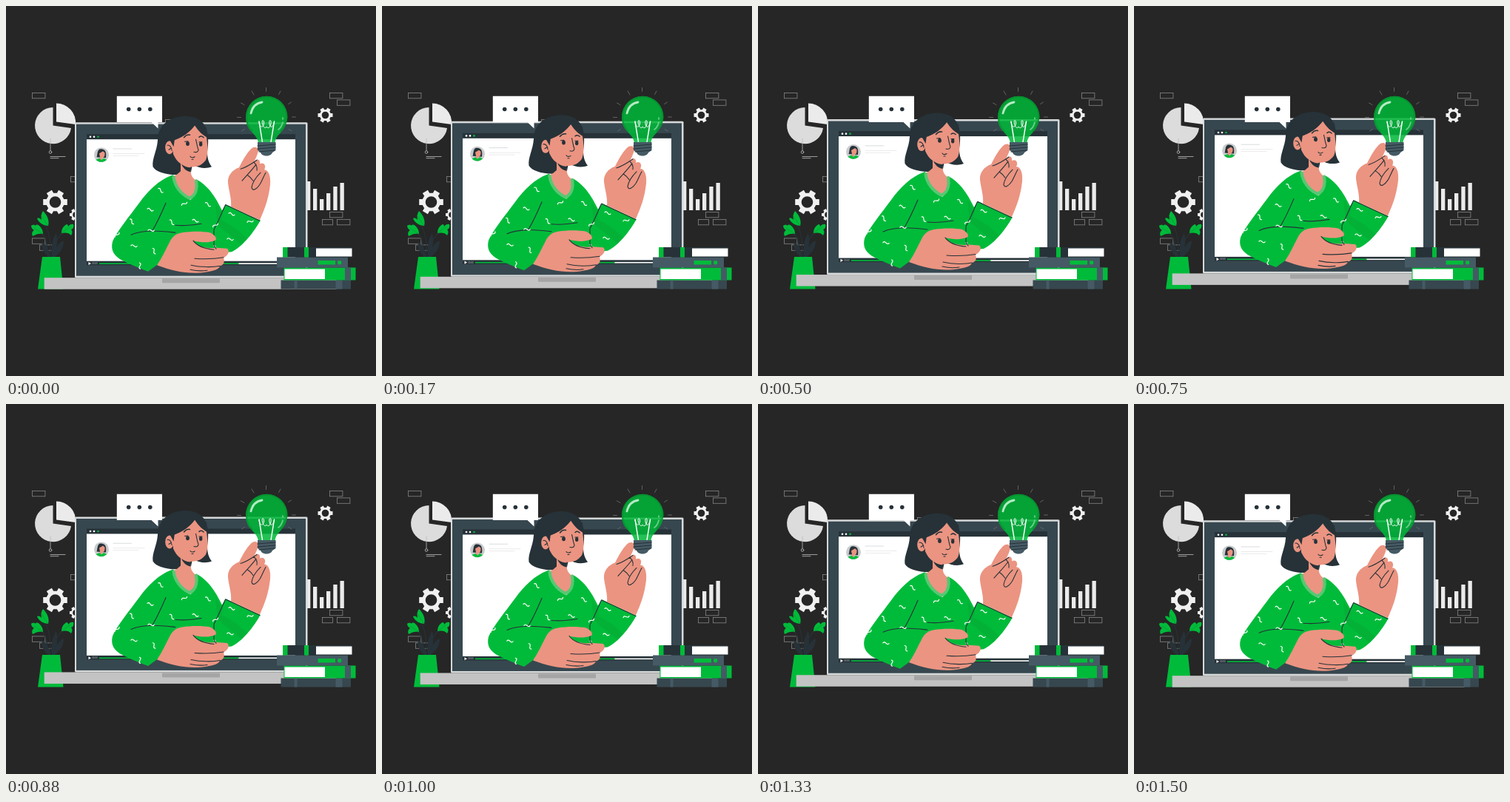
Animation of 500 by 500 pixels, one loop 1.54 s. Source, as an HTML page:

```html
<!DOCTYPE html>
<html lang="en">
<head>
<meta charset="utf-8">
<title>Online lesson</title>
<style>
  html, body { margin: 0; width: 100%; height: 100%; overflow: hidden; background: #262626; }
  svg { display: block; width: 100vw; height: 100vh; }
  .ink { fill: none; stroke: #263238; stroke-width: 1.1; stroke-linecap: round; stroke-linejoin: round; }
  .skin { fill: #eb9481; }
  .hair { fill: #263238; }
  .green { fill: #00bb3a; }
  .slate { fill: #37474f; }
  .line { fill: none; stroke-linecap: round; }
</style>
</head>
<body>
<svg viewBox="0 0 500 500">
  <rect width="500" height="500" fill="#262626"/>

  <g id="boxes" fill="none" stroke="#858585" stroke-width=".8"></g>

  <g id="pie">
    <path fill="#dcdcdc" d="M63.5 137A24.6 24.6 0 1 0 88 165L63.5 161.5Z"/>
    <path fill="#ebebeb" d="M68 131.5A26 26 0 0 1 94 160L68 156.5Z"/>
    <g class="line" stroke="#bdbdbd" stroke-width=".8">
      <path d="M60 179V195.5M60 203.5H80M60 205.7H71"/>
      <circle cx="60" cy="197.5" r="1.8"/>
    </g>
  </g>
  <g id="gears" fill="#f0f0f0" fill-rule="evenodd"></g>
  <g id="bars" fill="#ebebeb"></g>

  <g id="plant">
    <g class="line" stroke="#263238" stroke-width="1.2">
      <path d="M60 340C61 318 57 302 52 294M57 340C57 322 53 309 44 304M64 340C65 320 70 310 80 304"/>
    </g>
    <path class="hair" d="M57 339C48 331 48 324 49 319C56 324 59 331 60 339ZM62 339C60 324 64 312 68 307C71 318 68 331 64 339ZM64 339C66 327 71 320 78 317C78 327 73 334 66 339Z"/>
    <g class="green">
      <path d="M42 287C45 286 46 287 48 289C47 283 48 280 50 277C56 283 59 290 57 297C51 297 44 293 42 287Z"/>
      <path d="M34 297C37 295 39 296 40 297C40 295 43 295 45 297C49 301 50 304 50 308C45 307 41 308 36 311C34 307 36 304 38 303C36 302 34 300 34 297Z"/>
      <path d="M75 307C75 301 78 297 82 295C83 295 84 296 84 298C86 295 89 294 91 295C92 298 91 301 88 302C90 304 90 307 88 310C85 306 80 306 75 307Z"/>
    </g>
    <path class="line" stroke="#098b31" stroke-width=".6" d="M47 283L57 297M38 300L50 308M75 307L86 299"/>
    <path class="green" d="M49 339H73L77.5 382.5H43Z"/>
  </g>

  <g class="float">
    <rect x="93" y="157" width="314.5" height="210" rx="1.5" fill="#d6d9da"/>
    <rect class="slate" x="95" y="159.5" width="310" height="205"/>
    <rect class="hair" x="109" y="173" width="282" height="177"/>
    <rect x="109" y="180" width="282" height="164.5" fill="#fff"/>
    <g fill="#fff">
      <circle cx="114" cy="176.6" r="1.3"/>
      <circle cx="119" cy="176.6" r="1.3"/>
      <circle class="green" cx="124.5" cy="176.6" r="1.3"/>
      <path d="M111.5 345.7L115 347.8L111.5 349.9Z"/>
      <text x="116.5" y="348.9" font-family="Roboto, sans-serif" font-size="2.8" opacity=".7">00:00</text>
      <rect x="314" y="347.1" width="72" height="1.6"/>
      <rect class="green" x="126" y="347.1" width="188.5" height="1.6"/>
    </g>
    <g id="avatar">
      <circle cx="129" cy="201" r="10" fill="#c9cccd"/>
      <path class="hair" d="M128 193C123 193 124 200 122.5 204L135 205C136 198 135 193 128 193Z"/>
      <path class="skin" d="M126 199L131 196L133.5 198C134 203 132 205 130 205L130.5 208H127V204Z"/>
      <path class="green" d="M121.5 207.5L126.5 205.5L129 208L132 205.5L136 207.5A10 10 0 0 1 121.5 207.5Z"/>
    </g>
    <path class="line" stroke="#d3d7da" stroke-width=".9" d="M145 192.8H169.5"/>
    <path class="line" stroke="#e5e5e5" stroke-width=".8" d="M145 199.3H187M145 202.2H179"/>
    <rect x="51.7" y="367" width="395" height="15.5" fill="#c3c3c3"/>
    <path d="M211 368H289V373Q289 374 288 374H212Q211 374 211 373Z" fill="#a5a5a5"/>
  </g>

  <g id="bubble">
    <path fill="#fff" d="M149.8 121.7H211V157H205.5V165.5L196.5 157H149.8Z"/>
    <g class="hair">
      <circle cx="165.7" cy="139.5" r="2.8"/>
      <circle cx="180.3" cy="139.5" r="2.8"/>
      <circle cx="194.8" cy="139.5" r="2.8"/>
    </g>
  </g>

  <g class="float">
    <!-- back hair and neck -->
    <path class="hair" d="M242 148.5C222 149 205 160 205 181C204 196 197 206 198.5 217C203 225 222 230 241 227L250 224L252 214C261 219 270 220 278 217C273 210 272 204 272 196C274 184 274 170 268 160C262 152 253 148.5 242 148.5Z"/>
    <path class="skin" d="M236 211L236 223C233 226 230 228 226 230C229 243 237 256 248 262C257 256 260 245 256 235C251 231 249 228 249.5 215Z"/>
    <path class="hair" d="M237 213C241 217 246 218 250 218L249.5 224C244 223 239 219 237 213Z"/>

    <!-- blouse -->
    <path class="green" d="M223 229C207 235 192 249 180 266C166 285 150 304 144 318C141 330 146 338 158 344C170 350 180 354 192 358.5L205 349L250 345L285 334L305 332C320 325 335 305 343.5 289.5L297 268L292 276C285 262 275 243 257 234C260 246 257 256 249 262C238 257 230 245 226 228Z"/>
    <path fill="#08a735" opacity=".5" d="M283 266L297 288L326 314L318 322L286 296Z"/>
    <path class="green" d="M297 268L343.5 289.5C340 297 334 304 329 311L291 289Z"/>
    <g class="line" stroke="#55c873">
      <path id="lace" stroke-width="4" d="M226.5 231C228 243 236 254 248 259.5C256 256 259 247 257 236"/>
      <use href="#lace" style="stroke-width:5.5" stroke-dasharray=".1 4.3"/>
    </g>
    <path class="ink" d="M216 266C210 280 204 293 198 303M169 309C187 301 210 304 229 306M229 296C239 297 252 296 264 294M296.5 268.5C292 278 287 291 281 302M281 302V324M297 268.5L343 290"/>
    <g id="marks" class="line" stroke="#fff" stroke-width="1.2"></g>

    <!-- lower hand -->
    <path class="skin" d="M204 350C211 340 216 328 222 317C226 310 231 307 238 306C250 304 266 304 276 306C282 309 285 313 283.5 316C276 320 265 320 253 317C259 325 271 328 285 326.5L299 327.5C303 331 300 337 294 340C296 346 294 350 289 351C288 356 279 358 272 359C250 363 228 359 204 350Z"/>
    <path class="ink" d="M253 317C259 325 268 328 281 329M281 323L284 328M255 341C269 342 285 341 294 339.5M250 350C263 353 280 353 289 351M249 356C258 358 266 358 272 357"/>

    <!-- pointing hand -->
    <path class="skin" d="M304 271C305 260 301 249 300 239C299 229 306 221 315 218C320 208 325 199 331 193C335 189 341 190 341 195C340 201 337 206 335 211C339 205 344 207 343 213C349 210 352 216 349 221C355 221 358 230 357 241C355 260 350 273 343 289Z"/>
    <path class="ink" d="M317 220C324 218 332 213 339 208M338 214C332 222 325 229 319 236M326 228C329 230 332 233 334 236M344 225C339 230 333 238 332 245C333 251 339 247 343 241C346 236 348 230 351 225M335 211C338 214 340 217 339 222"/>

    <!-- face -->
    <ellipse class="skin" cx="221" cy="191" rx="5.8" ry="9"/>
    <path class="skin" d="M225 182C238 178 249 170 255 161C260 169 266 174 271 177C273 191 273 201 270 208C264 216 256 218 248 217C238 216 231 211 226 200Z"/>
    <path class="hair" d="M256 160C250 168 240 176 228 179L226.5 190L222 182C226 166 242 158 256 160ZM256 160C260 169 266 174 272 177L271 164Z"/>
    <path class="ink" d="M218 188C221 187 224 191 224 195M220 194L223 192"/>
    <path class="ink" style="stroke-width:1.5" d="M240.5 177.5Q244 173 248.5 174M261 177Q264 174.5 267 177.5"/>
    <g class="hair">
      <ellipse cx="245.5" cy="185.8" rx="2.4" ry="3"/>
      <ellipse cx="263.2" cy="186.5" rx="2.2" ry="3"/>
    </g>
    <path class="ink" d="M241.5 183L246 182.5M261 183.5L265 183.5M256.500 180C258 185 258 190 260 194C260 197 257 198 254 197M249 203C250 205 253 205 255 203.500M251 207H253"/>
  </g>

  <g id="books">
    <rect class="slate" x="371.5" y="370.5" width="94.5" height="12"/>
    <rect x="389.5" y="370.5" width="4" height="12" fill="#455a64"/>
    <rect x="445.5" y="370.5" width="9" height="12" fill="#455a64"/>
    <rect class="green" x="375.5" y="353.5" width="97" height="17"/>
    <rect x="376.5" y="355.5" width="54.5" height="13.5" fill="#fff"/>
    <rect x="458" y="353.5" width="8" height="17" fill="#455a64"/>
    <rect x="366" y="339.5" width="96" height="14" fill="#455a64"/>
    <rect class="green" x="421.5" y="344" width="23.5" height="5.5"/>
    <circle class="green" cx="450.7" cy="346.7" r="2.7"/>
    <rect class="hair" x="374" y="326" width="93" height="13.5"/>
    <rect class="green" x="374" y="326" width="6.5" height="13.5"/>
    <rect class="green" x="403" y="326" width="6" height="13.5"/>
    <rect x="419" y="327.5" width="48.5" height="11" fill="#fff"/>
  </g>

  <g id="bulb">
    <path class="line" stroke="#696969" stroke-width=".9" d="M351.5 110.5V115.5M332 115L335 120M371 115L368.5 119.5M317.5 131L322 133.5M385.5 130L381.5 132.5M312.5 150.5H317.5M386.5 150H391.5M318.5 169L322.5 166.5M382 166.5L386 169"/>
    <path fill="#00b93a" opacity=".86" d="M341 185C340 178 336 175 332 170C326 165 324 157 324 150A28.2 28.2 0 0 1 380.4 150C380 158 377 165 372 170C368 175 364 178 363.5 185Z"/>
    <path fill="none" stroke="#078a2c" stroke-width="2" opacity=".6" d="M333 169.500C327 164 325 157 325 150A27.200 27.200 0 0 1 379.400 150C379 158 376 164 371 169.500"/>
    <g class="line" stroke="#fff">
      <path stroke-width="1.5" d="M342 156L346.500 184M362.500 156L358 184"/>
      <path stroke-width="1" d="M342 157C343 164 347 166 348.500 159C349 153 345 153 346.500 159C348 165 351 166 352 163C354 166 357 165 358 159C359 153 355 153 356 159C357 166 361 164 362.500 157"/>
      <path stroke="#b5eac4" stroke-width="2.800" d="M331 145C333 136 339 131 346 130"/>
      <path stroke="#75cf8f" stroke-width="1.600" d="M374 157C373 161 371 165 368 167M374 151V153"/>
    </g>
    <path fill="#455a64" d="M340 184H364.500V195L360 198C358 204 346 204 344 198L340 195Z"/>
    <path class="line" stroke="#263238" stroke-width="1" d="M340 189L364 187M340 193L364 191M342 197L363 195"/>
  </g>
</svg>

<script>
  const NS = "http://www.w3.org/2000/svg";
  const add = (id, tag, attrs) => {
    const el = document.createElementNS(NS, tag);
    for (const key in attrs) el.setAttribute(key, attrs[key]);
    document.getElementById(id).append(el);
  };

  [[35, 117], [437, 117], [447, 126.5], [437, 278], [427, 288, 14], [447, 288],
   [35, 313.5], [45, 322.5], [87, 230], [215, 153]]
    .forEach(([x, y, width = 17.5]) =>
      add("boxes", "rect", { x: x + .4, y: y + .4, width, height: 7.4 }));

  [[406, 237], [415, 247], [424, 261], [433, 253], [442.3, 244], [451.5, 239]]
    .forEach(([x, y]) => add("bars", "rect", { x, y, width: 5.3, height: 276 - y }));

  // Six broad teeth around a ring with a round hole.
  function gear(cx, cy, r) {
    const at = (deg, k) => {
      const a = deg * Math.PI / 180;
      return `${(cx + r * k * Math.cos(a)).toFixed(2)} ${(cy + r * k * Math.sin(a)).toFixed(2)}`;
    };
    const points = [];
    for (let a = 0; a < 360; a += 60)
      points.push(at(a - 19, .76), at(a - 14, 1.03), at(a + 14, 1.03), at(a + 19, .76));
    const h = r * .48;
    const hole = `M${cx - h} ${cy}a${h} ${h} 0 1 0 ${2 * h} 0a${h} ${h} 0 1 0 ${-2 * h} 0Z`;
    add("gears", "path", { d: `M${points.join("L")}Z${hole}` });
  }
  gear(66.5, 265, 16.3);
  gear(431.5, 147.5, 10);
  gear(94, 282, 8);

  // Fabric squiggles: x, y, angle.
  [[209, 249, 25], [195, 275, 0], [170, 291, 40], [150, 309, -60], [173, 324, -10],
   [200, 331, 50], [224, 292, 35], [256, 290, 0], [241, 267, -45], [273, 268, 20],
   [305, 281, 0], [283, 296, -50], [303, 315, -10], [330, 291, -30], [283, 327, 40],
   [181, 351, 70], [196, 303, -15]]
    .forEach(([x, y, a]) => add("marks", "path", {
      d: "M-4 -1C-2 -3 -1 -1 0 0S2 3 4 1", transform: `translate(${x} ${y}) rotate(${a})`
    }));

  const LOOP = 1540, STEP = 1000 / 24, PERIOD = 1500, LEAD = 25, RISE = 6.2, REST = .4;
  const floats = document.querySelectorAll(".float");
  const start = performance.now();

  function draw(now) {
    const t = Math.max(0, now - start) % LOOP;
    const held = Math.floor((t + 4.9) / STEP) * STEP;
    const phase = (held + LEAD) % PERIOD / PERIOD;
    const y = REST - RISE * (1 - Math.abs(1 - 2 * phase));
    floats.forEach(g => g.setAttribute("transform", `translate(0 ${y.toFixed(3)})`));
    requestAnimationFrame(draw);
  }
  draw(start);
</script>
</body>
</html>
```
